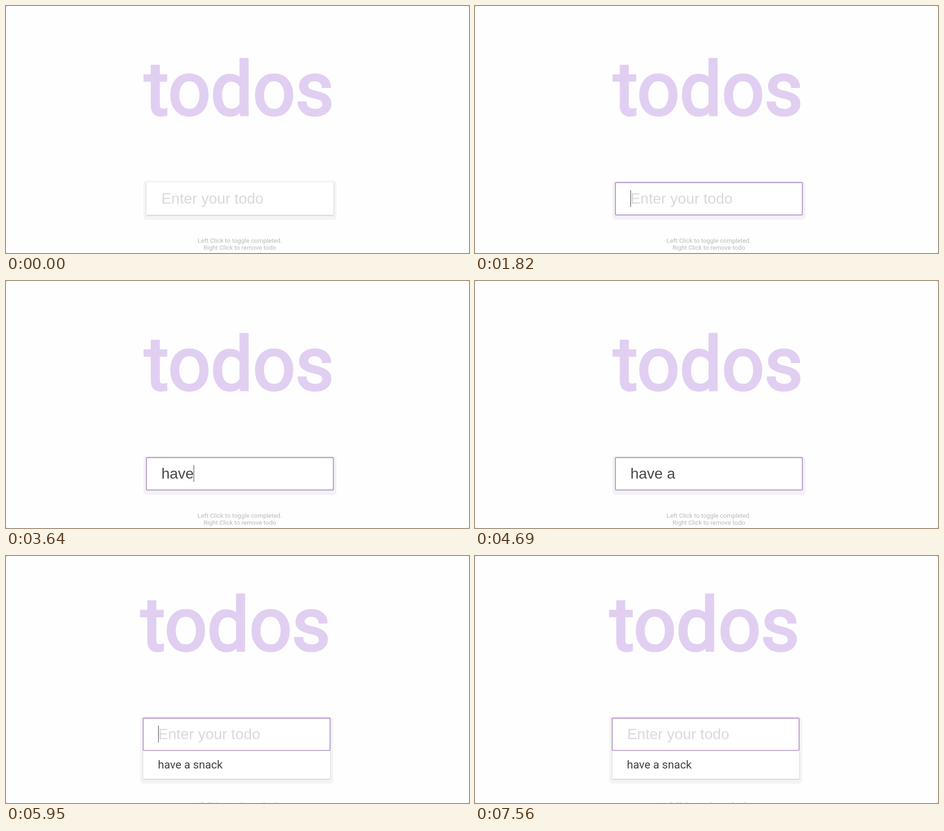
An HTML page that plays this animation: 992x530 px, repeating every 8 s.

```html
<!DOCTYPE html>
<html lang="en">
<head>
<meta charset="utf-8">
<title>todos</title>
<style>
  html, body { margin: 0; width: 100%; height: 100%; overflow: hidden; background: #777; }
  svg { display: block; width: 992px; height: 530px; background: #fefefe; border-radius: 2px; }
  text { white-space: pre; font-family: Roboto, sans-serif; }
  .title { font-size: 160px; fill: #e1cff2; stroke: #e1cff2; stroke-width: 5px; }
  .field { font: 32px "Liberation Sans", Arial, sans-serif; }
  .item { font-size: 24px; fill: #424242; }
  .hint { font-size: 13.33px; fill: #b9b9b9; text-anchor: middle; }
  .card { fill: #fff; filter: drop-shadow(0 1px 1.5px rgba(0, 0, 0, .22)); }
  .focus { fill: #fff; stroke: #a985c3; stroke-width: 1.6px; }
  #caret { fill: #333; }
</style>
</head>
<body>
<svg viewBox="0 0 992 530">
  <text id="title" class="title" x="296.4" y="233">todos</text>
  <g id="panel">
    <rect id="halo" x="294.5" y="375.5" width="413.5" rx="7"/>
    <rect id="card" class="card" x="301" y="378" width="400.5" rx="1"/>
    <rect id="focus" class="focus" x="300.9" y="378.9" width="400.4" height="69.4" rx="2"/>
    <text id="field" class="field" x="333" y="424"></text>
    <rect id="caret" y="395" width="1" height="36"/>
    <text id="item" class="item" x="332.5" y="487">have a snack</text>
  </g>
  <g id="hints" class="hint">
    <text x="501" y="508">Left Click to toggle completed.</text>
    <text x="501" y="523">Right Click to remove todo</text>
  </g>
</svg>
<script>
  const LOOP = 8000, FOCUS = 1820, SUBMIT = 5950;
  const phrase = "have a snack";
  const keyTimes = [3150, 3360, 3500, 3640, 3850, 3990, 4200, 4760, 4970, 5110, 5250, 5460];
  // Each pair is the start and end of a hidden caret phase.
  const caretOff = [[0, FOCUS], [2380, 2870], [4690, 4760], [6510, 7000], [7560, LOOP]];

  const $ = id => document.getElementById(id);
  const show = (id, on) => $(id).setAttribute("visibility", on ? "visible" : "hidden");
  const move = (id, x, y) => $(id).setAttribute("transform", `translate(${x} ${y})`);
  let last = "";

  function draw(t) {
    const focused = t >= FOCUS, added = t >= SUBMIT;
    const typed = added ? "" : phrase.slice(0, keyTimes.filter(k => k <= t).length);
    const caret = !caretOff.some(([a, b]) => t >= a && t < b);
    const state = [focused, added, typed, caret].join("|");
    if (state === last) return;
    last = state;

    const field = $("field");
    field.textContent = typed || "Enter your todo";
    field.setAttribute("fill", typed ? "#484848" : "#d9d9d9");
    const width = typed ? field.getComputedTextLength() : 0;
    $("caret").setAttribute("x", Math.round(333 + width));

    show("caret", caret);
    show("focus", focused);
    show("item", added);
    $("halo").setAttribute("height", added ? 144 : 83.5);
    $("halo").setAttribute("fill", focused && !added ? "#f4f2f6" : "#f4f4f4");
    $("card").setAttribute("height", added ? 131 : 70);

    // The page re-centres when the list makes it taller than the window.
    move("title", added ? -7.5 : 0, added ? -31 : 0);
    move("panel", added ? -7 : 0, added ? -31 : 0);
    move("hints", added ? -7.5 : 0, added ? 30 : 0);
  }

  function tick() {
    draw(performance.now() % LOOP);
    requestAnimationFrame(tick);
  }
  tick();
</script>
</body>
</html>
```
